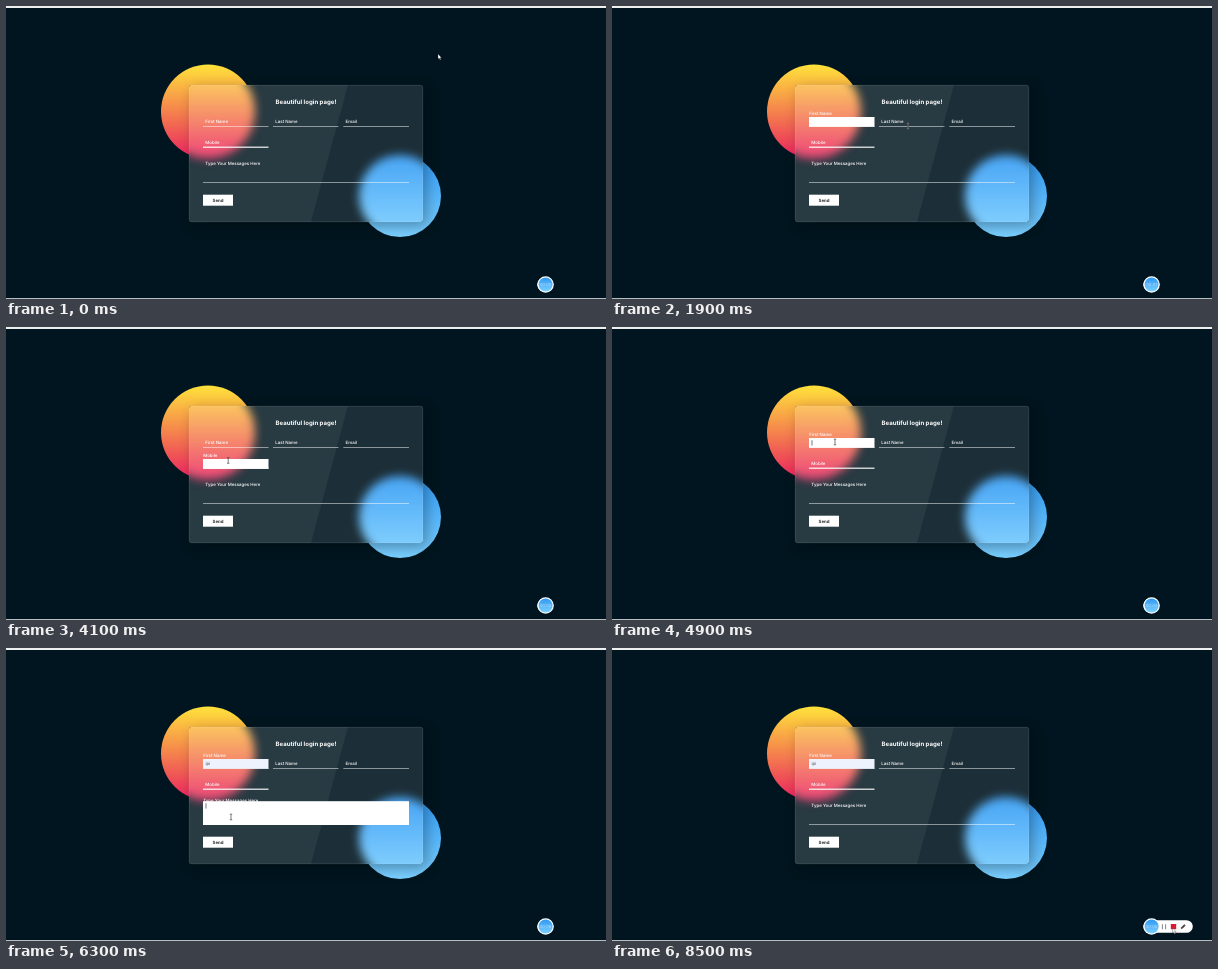
These frames come from a looping animation (600 px wide and 293 px high, 8.6 s). An HTML page:

```html
<!DOCTYPE html>
<html lang="en">
<head>
<meta charset="utf-8">
<title>Login form</title>
<style>
html, body { margin: 0; width: 100%; height: 100%; overflow: hidden; background: #00151f; }
svg { display: block; width: 600px; height: 293px; }
text { font: 500 4.4px Inter, "Open Sans", sans-serif; fill: #fff; text-rendering: geometricPrecision; }
text.title { font-size: 6.05px; font-weight: 700; }
text.send { font-weight: 600; fill: #111; }
text.typed { font-weight: 400; fill: #444b58; }
text.timer { font-size: 4.2px; font-weight: 400; fill: #b5dcff; }
</style>
</head>
<body>
<svg viewBox="0 0 600 293">
  <defs>
    <linearGradient id="sun" x2="0" y2="1"><stop stop-color="#ffe23a"/><stop offset="1" stop-color="#ea2260"/></linearGradient>
    <linearGradient id="sky" x2="0" y2="1"><stop stop-color="#3099f3"/><stop offset="1" stop-color="#7bd0ff"/></linearGradient>
    <filter id="blur" x="-30%" y="-30%" width="160%" height="160%" color-interpolation-filters="sRGB"><feGaussianBlur stdDeviation="5"/></filter>
    <filter id="soft" x="-20%" y="-20%" width="140%" height="140%"><feGaussianBlur stdDeviation="7"/></filter>
    <clipPath id="card"><rect x="183" y="79" width="234" height="137" rx="2.5"/></clipPath>
    <g id="balls">
      <circle cx="202" cy="105.5" r="47" fill="url(#sun)"/>
      <circle cx="394" cy="190" r="41" fill="url(#sky)"/>
    </g>
  </defs>

  <rect width="600" height="293" fill="#00151f"/>
  <rect width="600" height="2" fill="#eef0f0"/>
  <rect y="292.2" width="600" height="1" fill="#e4e8ea"/>
  <use href="#balls"/>
  <rect x="187" y="83" width="234" height="137" filter="url(#soft)" opacity=".3"/>

  <!-- frosted card -->
  <g clip-path="url(#card)">
    <rect x="183" y="79" width="234" height="137" fill="#00151f"/>
    <use href="#balls" filter="url(#blur)"/>
    <rect x="183" y="79" width="234" height="137" fill="#fff" opacity=".11"/>
    <path d="M183 79H342L305 216H183Z" fill="#fff" opacity=".05"/>
  </g>
  <rect x="183.2" y="79.2" width="233.6" height="136.6" rx="2.5" fill="none" stroke="#fff" stroke-opacity=".16" stroke-width=".6"/>

  <text class="title" x="300" y="97.8" text-anchor="middle">Beautiful login page!</text>
  <g id="form"></g>
  <text class="typed" id="typed" x="199.5" y="117.2"></text>
  <rect id="caret" width=".6" height="5.4" fill="#222"/>
  <rect x="197" y="188.7" width="30" height="11" fill="#fff"/>
  <text class="send" x="212" y="195.9" text-anchor="middle">Send</text>

  <!-- recorder badge -->
  <rect id="pill" x="531.3" y="272.2" height="12.6" rx="6.3" fill="#fff"/>
  <g id="tools">
    <path d="M550.4 276.3v5M553.6 276.3v5" stroke="#777" stroke-width=".9"/>
    <rect x="558.8" y="276" width="5.4" height="5.2" fill="#d81a32"/>
    <path d="M568.8 281l.5-1.8 3-3 1.3 1.3-3 3z" fill="#444"/>
  </g>
  <circle cx="539.6" cy="278.5" r="8.2" fill="#fff"/>
  <circle cx="539.6" cy="278.5" r="7" fill="url(#sky)"/>
  <text class="timer" id="timer" x="539.6" y="280" text-anchor="middle"></text>

  <path id="arrow" d="M0 0V5L1.2 4L2 5.9L2.9 5.5L2.1 3.7H3.6Z" fill="#fff" stroke="#111" stroke-width=".3"/>
  <path id="beam" d="M-1.2-2.8H1.2M0-2.8V2.8M-1.2 2.8H1.2" fill="none" stroke="#bbb" stroke-width=".7" style="mix-blend-mode:difference"/>
</svg>
<script>
const LOOP = 8600, FADE = 500;
const $ = id => document.getElementById(id);
const clamp = v => Math.max(0, Math.min(1, v));
const smooth = v => (v = clamp(v), v * v * (3 - 2 * v));
const mix = (a, b, k) => a + (b - a) * k;

// focus: [start, end] spans; rest and raised are label baselines
const fields = [
  { label: "First Name", x: 197, y: 111, w: 65.5, h: 9.8, rest: 117.2, raised: 109.1, focus: [[1250, 2150], [4420, LOOP + 1]] },
  { label: "Last Name", x: 267, y: 111, w: 65.5, h: 9.8, rest: 117.2, raised: 109.1, focus: [[2150, 2800]] },
  { label: "Email", x: 337.3, y: 111, w: 65.7, h: 9.8, rest: 117.2, raised: 109.1, focus: [[2800, 3450]] },
  { label: "Mobile", x: 197, y: 132, w: 65.5, h: 9.8, rest: 138.3, raised: 130.2, line: 1.2, focus: [[3450, 4420]] },
  { label: "Type Your Messages Here", x: 197, y: 153.2, w: 206, h: 23.8, rest: 159.3, raised: 153.7, focus: [[5820, 6900]] }
];
const [first, , , , message] = fields;

// pointer stops: time, x, y
const path = [
  [0, 432, 48], [200, 432, 48], [1100, 232, 117], [1400, 232, 117], [1900, 296, 120],
  [2200, 298, 117], [2650, 362, 117], [2850, 362, 117], [3200, 221, 145], [3500, 222, 138],
  [4000, 222, 138], [4350, 223, 115], [5350, 223, 115], [5750, 225, 169], [6350, 225, 169],
  [6800, 290, 205], [7000, 290, 205], [7600, 535, 266], [7900, 541, 276], [8400, 560.5, 280], [LOOP, 560.5, 280]
];

function add(tag, attrs) {
  const node = document.createElementNS("http://www.w3.org/2000/svg", tag);
  set(node, attrs);
  return $("form").appendChild(node);
}
function set(node, attrs) {
  for (const key in attrs) node.setAttribute(key, attrs[key]);
}

for (const f of fields) {
  const { x, y, w, h, line = 0.7 } = f;
  add("rect", { x, y: y + h - line, width: w, height: line, fill: "#fff", opacity: line > 1 ? 0.95 : 0.7 });
  f.text = add("text", {});
  f.text.textContent = f.label;
  f.box = add("rect", { x, y, width: w, height: h, fill: "#fff" });
}

function pointer(t) {
  const i = path.findIndex(p => p[0] > t);
  const [t0, x0, y0] = path[i - 1], [t1, x1, y1] = path[i];
  const k = smooth((t - t0) / (t1 - t0));
  return [mix(x0, x1, k), mix(y0, y1, k)];
}

function draw(t) {
  const typed = "ipi".slice(0, Math.floor(clamp((t - 4900) / 300) * 3));
  let active = null, since = 0;

  for (const f of fields) {
    let lift = 0, on = false;
    for (const [a, b] of f.focus) {
      lift += smooth((t - a) / FADE) - smooth((t - b) / FADE);
      if (t >= a && t < b) { on = true; active = f; since = a; }
    }
    set(f.text, { x: mix(f.x + 2.3, f.x + 0.2, lift), y: mix(f.rest, f.raised, lift) });
    set(f.box, { visibility: on ? "visible" : "hidden" });
  }
  set(first.box, { fill: t >= 5400 ? "#eef2fc" : "#fff" });
  $("typed").textContent = typed;

  // the first field keeps its value after the message takes over and lets go
  const editing = active && !(active === first && t >= 5400);
  const blink = editing && (t - since) % 1000 < 500;
  set($("caret"), { visibility: blink ? "visible" : "hidden" });
  if (active) set($("caret"), {
    x: active.x + 2.7 + (active === first ? typed.length * 2 : 0),
    y: active.y + (active === message ? 2 : 2.2)
  });

  const [x, y] = pointer(t);
  const inField = fields.some(f => x > f.x && x < f.x + f.w && y > f.y && y < f.y + f.h);
  const place = `translate(${x} ${y})`;
  set($("arrow"), { transform: place, visibility: inField ? "hidden" : "visible" });
  set($("beam"), { transform: place, visibility: inField ? "visible" : "hidden" });

  const open = smooth((t - 7800) / 300);
  set($("pill"), { width: mix(16, 49.5, open) });
  set($("tools"), { opacity: clamp(open * 2 - 1) });
  $("timer").textContent = "00:0" + Math.floor(t / 1000);
}

function tick() {
  draw(Math.floor(performance.now() % LOOP / 100) * 100);
  requestAnimationFrame(tick);
}
tick();
</script>
</body>
</html>
```
